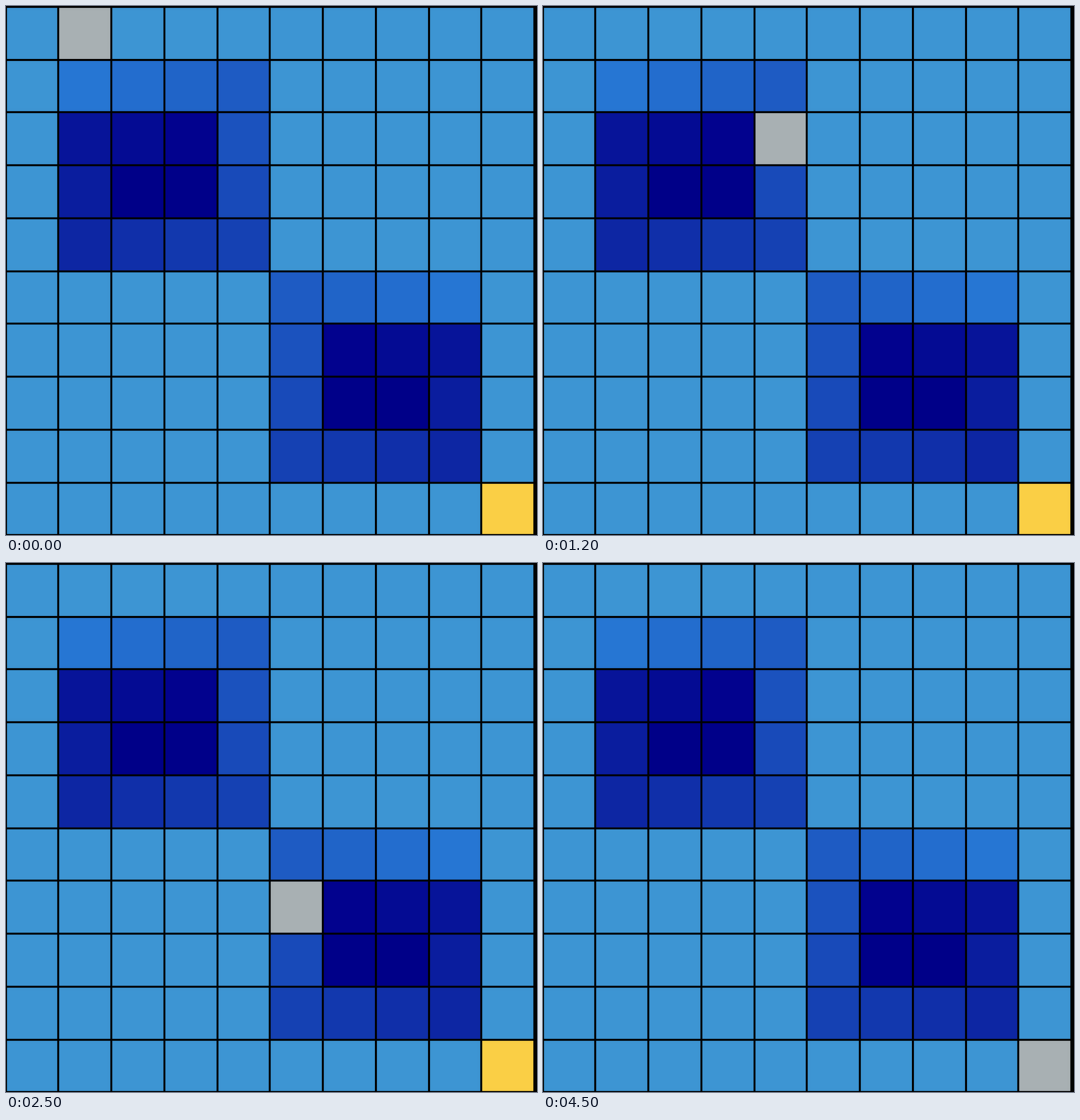
Write a matplotlib script that moves like this. It is 600 px wide and 598 px high and loops after 4600 ms.

```python
import matplotlib.pyplot as plt
from matplotlib.animation import FuncAnimation
from matplotlib.patches import Rectangle

W, H, DPI = 600, 598, 100
N, PITCH = 10, 59.75
LEFT, TOP = -0.5, 0.75
FRAMES, INTERVAL = 46, 100
STEP, LEAD = 250, 125  # ms per move, time already spent on the first cell

WATER, AGENT, GOAL = "#3d95d3", "#a8b0b3", "#facf45"

# Inward spiral of the whirlpool, from its mouth to its centre
SPIRAL = ([(c, 1) for c in range(1, 5)] + [(4, r) for r in range(2, 5)]
          + [(c, 4) for c in (3, 2, 1)] + [(1, 3), (1, 2)]
          + [(2, 2), (3, 2), (3, 3), (2, 3)])

# Moves of the agent: right or down
START, MOVES = (1, 0), "DRRRDDDRDDDDRDRRR"


def depth_color(k):
    rgb = (38 - 2.8 * k, 118 - 8.9 * k, max(211 - 5.3 * k, 136))
    return tuple(max(v, 0) / 255 for v in rgb)


def corner(cell):
    return LEFT + cell[0] * PITCH, TOP + cell[1] * PITCH


def add_cell(cell, color, z=1):
    rect = Rectangle(corner(cell), PITCH, PITCH, fc=color, ec="none",
                     lw=0, zorder=z)
    return ax.add_patch(rect)


def walk():
    path = [START]
    for m in MOVES:
        c, r = path[-1]
        path.append((c + 1, r) if m == "R" else (c, r + 1))
    return path


fig = plt.figure(figsize=(W / DPI, H / DPI), dpi=DPI, facecolor="black")
ax = fig.add_axes([0, 0, 1, 1])
ax.set(xlim=(0, W), ylim=(H, 0))
ax.axis("off")

ax.add_patch(Rectangle((LEFT, TOP), N * PITCH, N * PITCH, fc=WATER, lw=0))
for k, (c, r) in enumerate(SPIRAL):
    add_cell((c, r), depth_color(k))
    add_cell((9 - c, r + 4), depth_color(k))
add_cell((9, 9), GOAL)

path = walk()
agent = add_cell(START, AGENT, z=2)

for i in range(N + 1):
    x, y = corner((i, i))
    style = dict(color="black", lw=2.3 * 72 / DPI, zorder=3)
    ax.plot([x, x], [0, H], **style)
    ax.plot([0, W], [y, y], **style)


def update(i):
    n = int((i * INTERVAL + LEAD) // STEP)
    agent.set_xy(corner(path[min(n, len(path) - 1)]))
    return [agent]


anim = FuncAnimation(fig, update, frames=FRAMES, interval=INTERVAL,
                     repeat=True, repeat_delay=0, blit=False)
plt.show()
```
